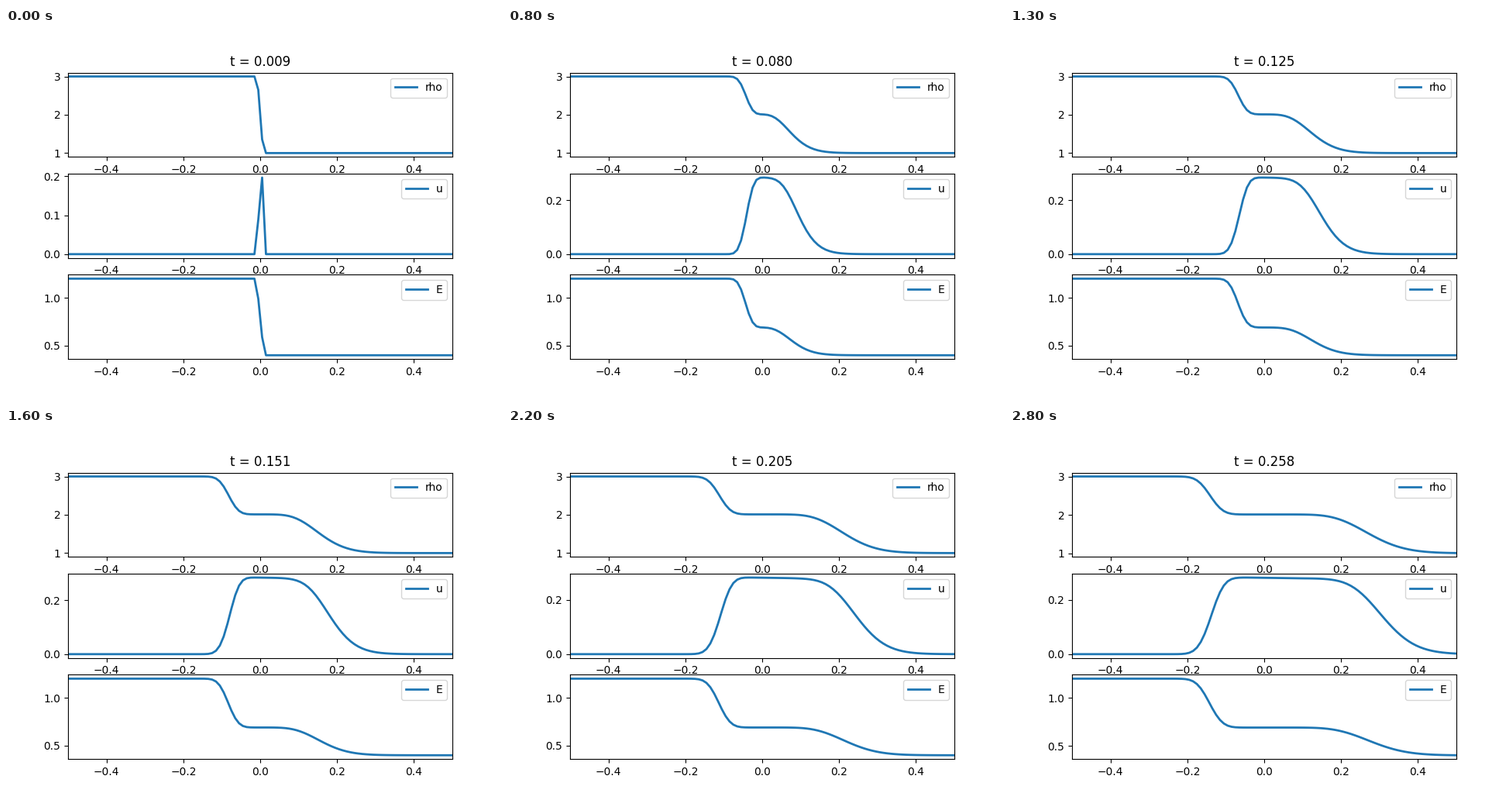
Animation of 640x480 px, one loop 2900 ms. Source, as a matplotlib script:

```python
import numpy as np
import matplotlib.pyplot as plt
from matplotlib.animation import FuncAnimation

STEPS = 29
DT = 0.00891
DX = 0.01
HALF = 51                      # cells on each side of the diaphragm
NU_LEFT, NU_RIGHT = 0.491, 0.495
NU_START = 0.352

x = (np.arange(2 * HALF) - HALF + 0.5) * DX


def wave_history():
    """Step profiles of the left- and right-going waves after every step."""
    left = np.where(x < 0, 1.0, 0.0)
    right = left.copy()
    left[HALF - 1] = 1 - NU_START
    right[HALF] = NU_START
    history = [(left.copy(), right.copy())]
    for _ in range(STEPS - 1):
        # explicit upwind to the left, swept in place to the right
        left[:-1] += NU_LEFT * (left[1:] - left[:-1])
        for i in range(1, len(x)):
            right[i] += NU_RIGHT * (right[i - 1] - right[i])
        history.append((left.copy(), right.copy()))
    return history


HISTORY = wave_history()


def fields(n):
    """Density, velocity and energy after step n."""
    l, r = HISTORY[n]
    t = DT * (n + 1)
    fade = 0.4 ** n

    rho = 1 + 1.01 * r + 0.99 * l

    peak = 0.2845 - 0.003 * np.clip((t - 0.165) / 0.06, 0, 1)
    tilt = 1 - 0.07 * np.clip(x + 0.05, 0, 0.15)
    u = peak * tilt * r * (1.8 - 0.8 * r) * (1 - l) * (1 - 0.18 * l)
    u[HALF] += 0.045 * fade

    energy = 0.4 + 0.29 * r * (1.1 - 0.1 * r) + 0.51 * l * (0.92 + 0.08 * l)
    energy[HALF] += 0.08 * fade
    energy[HALF - 1] -= 0.02 * fade
    return rho, u, energy


fig, axes = plt.subplots(3, 1, figsize=(6.4, 4.8), dpi=100)
lines = []
for ax, name in zip(axes, ("rho", "u", "E")):
    line, = ax.plot(x, np.zeros_like(x), lw=2, color="#1f77b4", label=name)
    ax.set_xlim(-0.5, 0.5)
    ax.legend(loc="upper right")
    lines.append(line)
title = axes[0].set_title("")


def draw(n):
    for ax, line, values in zip(axes, lines, fields(n)):
        line.set_ydata(values)
        low, high = values.min(), values.max()
        margin = 0.05 * (high - low)
        ax.set_ylim(low - margin, high + margin)
    title.set_text(f"t = {DT * (n + 1):.3f}")
    return lines + [title]


anim = FuncAnimation(fig, draw, frames=STEPS, interval=100,
                     init_func=lambda: draw(0), repeat=True, repeat_delay=0)
plt.show()
```
